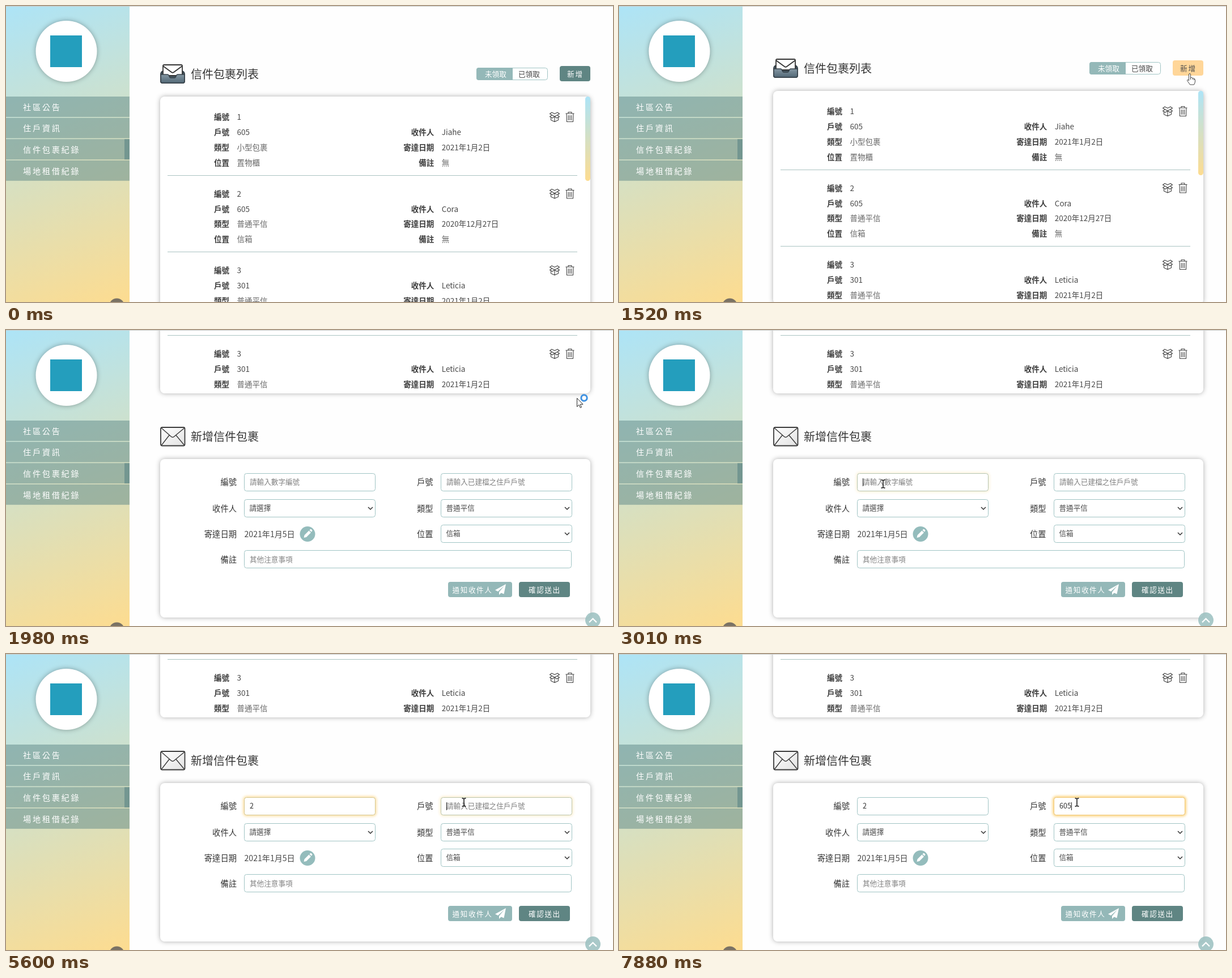
An HTML page that plays this animation: 1071 by 523 pixels, repeating every 8000 ms.

```html
<!DOCTYPE html>
<html lang="zh-Hant">
<head>
<meta charset="utf-8">
<title>信件包裹紀錄</title>
<style>
  html, body { margin: 0; width: 100%; height: 100%; overflow: hidden; background: #fefefe; }
  svg { display: block; width: 1071px; height: 523px; }
  text { font-family: "Noto Sans CJK TC", "Noto Sans CJK", "Noto Sans CJK JP", "Noto Sans", sans-serif; white-space: pre; }
  .label { font-weight: 600; fill: #3c3c3c; }
  .title, .field { font-weight: 500; fill: #333; }
  .value { font-weight: 350; fill: #484848; }
  .soft { font-weight: 300; fill: #666; }
  .hint { font-weight: 300; fill: #808080; }
  .light { font-weight: 350; fill: #fff; }
  .card { fill: #fff; filter: drop-shadow(0 0 4px rgba(0, 0, 0, .32)); }
  .box { fill: #fff; stroke: #a0c4c4; }
  .halo { fill: none; stroke: #fcd27a; stroke-width: 5; filter: blur(2px); }
  .icon { fill: none; stroke: #444; stroke-width: 1.1; stroke-linejoin: round; }
  .arrow { fill: none; stroke: #333; stroke-width: 1.5; }
</style>
</head>
<body>
<svg id="stage" viewBox="0 0 1071 523"></svg>
<script>
const LOOP = 8000;
const SCROLL = 425;
const clamp = v => Math.max(0, Math.min(1, v));
const progress = (t, from, to) => clamp((t - from) / (to - from));
const swing = p => .5 - Math.cos(p * Math.PI) / 2;

// ---------- drawing helpers: text is centred vertically on y ----------
const text = (x, y, str, cls, size = 13.5, extra = '') =>
  `<text x="${x}" y="${y + size * .38}" class="${cls}" font-size="${size}" ${extra}>${str}</text>`;
const rightText = (x, y, str, cls, size) => text(x, y, str, cls, size, 'text-anchor="end"');
const spaced = (x, y, str, cls, size, gap) => text(x, y, str, cls, size, `letter-spacing="${gap}"`);
const rect = (x, y, w, h, r, attrs) => `<rect x="${x}" y="${y}" width="${w}" height="${h}" rx="${r}" ${attrs}/>`;
const path = (d, attrs) => `<path d="${d}" ${attrs}/>`;
const at = (x, y, body, attrs = '') => `<g transform="translate(${x} ${y})" ${attrs}>${body}</g>`;

const inputBox = (x, y, w = 231) => rect(x + .5, y + .5, w, 31, 4, 'class="box"');
const selectBox = (x, y, str) => inputBox(x, y) + text(x + 9.5, y + 15.5, str, 'value', 12.6) +
  path(`M${x + 219} ${y + 14}l4 4 4-4`, 'class="arrow"');

const packageIcon = path('M0-5.5L-5-8-8.5-5.5-4.5-3.2-8.5-.5-4 2 0-.8 4 2 8.5-.5 4.5-3.2 8.5-5.5 5-8ZM-4.5-3.2L0-.8 4.5-3.2M-6.5 1V5.5L0 8.5 6.5 5.5V1M0-.8V8.5', 'class="icon"');
const trashIcon = path('M-7.5-6H7.5M-3-6V-8.5H3V-6M-6-6L-5.5 8.5H5.5L6-6M-2.7-3V6M0-3V6M2.7-3V6', 'class="icon"');

function parcel(index, [unit, kind, place, person, date]) {
  const y = 196 + index * 135.5;
  const left = [['編號', index + 1], ['戶號', unit], ['類型', kind], ['位置', place]];
  const right = [['收件人', person], ['寄達日期', date], ['備註', '無']];
  const visible = index < 2 ? 4 : 3;
  const tone = value => /^\w/.test(value) ? 'value' : 'soft';
  const pair = (x, line, [name, value]) =>
    rightText(x, y + line * 26.9, name, 'label') + text(x + 13.5, y + line * 26.9, value, tone(value));
  return left.slice(0, visible).map((p, i) => pair(394, i, p)).join('') +
    right.slice(0, visible - 1).map((p, i) => pair(755.3, i + 1, p)).join('') +
    at(968, y, packageIcon) + at(995, y, trashIcon) +
    (index < 2 ? rect(285, Math.floor(y + 103), 723, 1, 0, 'fill="#aac3c1"') : '');
}

const trayIcon = at(272, 103,
  path('M5 12Q1 13 1 18V30Q1 33 4 33H40Q43 33 43 30V18Q43 13 39 12Z', 'fill="#43545f" stroke="#37424a" stroke-width="1.8"') +
  path('M5 20V3Q5 1 7 1H37Q39 1 39 3V20Z', 'fill="#fff" stroke="#333" stroke-width="1.8"') +
  path('M5 3L20 14Q22 15.5 24 14L39 3', 'fill="none" stroke="#333" stroke-width="1.8"') +
  path('M1 18V30Q1 33 4 33H40Q43 33 43 30V18H31Q29 18 28 21T25 24H19Q17 24 16 21T13 18Z',
    'fill="url(#tray)" stroke="#37424a" stroke-width="1.6" stroke-linejoin="round"'));

const envelopeIcon = at(272, 596,
  rect(1, 1, 42.5, 32.5, 2.5, 'fill="url(#paper)" stroke="#3a3a3a" stroke-width="1.8"') +
  path('M2 2L19 17Q22 20 25 17L43 2M2 33L16 15M43 33L28 15', 'fill="none" stroke="#3a3a3a" stroke-width="1.4"'));

const listPage = trayIcon + text(326, 120, '信件包裹列表', 'title', 20) +
  rect(830.5, 109.5, 125, 21, 4, 'class="box"') +
  path('M894 109V131H834Q830 131 830 127V113Q830 109 834 109Z', 'fill="#94b8b8"') +
  text(845, 120, '未領取', 'light', 12.6) + text(904, 120, '已領取', 'value', 12.6) +
  rect(977, 106, 54, 27, 4, 'id="addButton"') +
  text(990, 120.5, '新增', 'light', 12.6, 'letter-spacing="1.8" id="addText"') +
  rect(272, 160, 759, 377, 8, 'class="card"') +
  rect(1022, 160, 9, 149, 4.5, 'fill="url(#bar)"') +
  [['605', '小型包裹', '置物櫃', 'Jiahe', '2021年1月2日'],
   ['605', '普通平信', '信箱', 'Cora', '2020年12月27日'],
   ['301', '普通平信', '', 'Leticia', '2021年1月2日']].map((p, i) => parcel(i, p)).join('');

// Form coordinates are those seen after scrolling to the end.
const fieldX = [430, 777];
const hints = ['請輸入數字編號', '請輸入已建檔之住戶戶號'];
const entry = i => {
  const x = fieldX[i] - 10;
  return inputBox(x, 253) +
    `<g id="glow${i}">` + rect(x + .5, 253.5, 231, 31, 4, 'class="halo"') +
    rect(x + .5, 253.5, 231, 31, 4, 'fill="#fff" stroke="#efc673"') + '</g>' +
    text(fieldX[i], 268.5, hints[i], 'hint', 12.6, `id="entry${i}"`);
};
const formLabel = (x, y, str) => rightText(x, y, str, 'field', 14.3);
const form = at(0, SCROLL,
  text(326, 188, '新增信件包裹', 'title', 20) +
  rect(272, 228, 759, 280, 8, 'class="card"') +
  formLabel(407, 269, '編號') + formLabel(407, 316, '收件人') +
  formLabel(407, 361, '寄達日期') + formLabel(407, 406, '備註') +
  formLabel(753.5, 269, '戶號') + formLabel(753.5, 316, '類型') + formLabel(753.5, 361, '位置') +
  entry(0) + entry(1) + rect(0, 262, 1, 14, 0, 'id="caret" fill="#222"') +
  selectBox(420, 299, '請選擇') + selectBox(767, 299, '普通平信') + selectBox(767, 344, '信箱') +
  text(420.5, 361, '2021年1月5日', 'value', 14.1) +
  '<circle cx="532" cy="360.5" r="13.5" fill="#94bcbc"/>' +
  path('M525.5 367L526.5 362.5 534.5 354.5 538 358 530 366ZM535.5 353.5L537 352Q538 351.5 539 352.5L540 353.5Q541 354.5 540 355.5L538.8 356.8Z', 'fill="#fff"') +
  inputBox(420, 389, 577) + text(430, 405, '其他注意事項', 'hint', 12.6) +
  rect(780, 445, 113, 27, 4, 'fill="#94b8b8"') + spaced(787.5, 459.5, '通知收件人', 'light', 12.6, 1.6) +
  path('M882 449L863 459.5 868 462 879 452 870 463V468L873.5 464.5 878.5 466.5Z', 'fill="#fff"') +
  rect(905, 445, 90, 27, 4, 'fill="#5f8583"') + spaced(922, 459.5, '確認送出', 'light', 12.6, 1.6));

const menu = ['社區公告', '住戶資訊', '信件包裹紀錄', '場地租借紀錄'].map((name, i) => {
  const y = 160 + i * 37.6;
  return rect(0, y, 218, 36, 0, 'fill="#5f8787" fill-opacity=".5"') +
    spaced(30, y + 18.5, name, 'light', 14.2, 2.7);
}).join('');

const sidebar = rect(0, 0, 218, 523, 0, 'fill="url(#side)"') +
  '<circle cx="106.5" cy="80" r="54" class="card"/>' +
  rect(78, 52, 56, 56, 0, 'fill="#249ebd"') + menu +
  rect(209, 235.2, 9, 36, 0, 'fill="#5f8787" fill-opacity=".65"') +
  '<circle cx="195.5" cy="530" r="13.5" fill="#7a7264"/>';

const gradient = (id, from, to, coords) =>
  `<linearGradient id="${id}" ${coords}><stop stop-color="${from}"/><stop offset="1" stop-color="${to}"/></linearGradient>`;
const downwards = 'x1="0" y1="0" x2="0" y2="1"';

const cursors =
  path('M.5.5V15.5L4 12.2 6.3 17.3 8.5 16.4 6.2 11.3H11Z', 'id="pointer" fill="#fff" stroke="#111" stroke-width=".9"') +
  path('M-1.5 12V1Q-1.5-.5 0-.5T1.5 1V6.5Q4.5 5.5 5 7.5 7 7 7.5 8.5 9.5 8.5 9.5 10.5V13Q9.5 16 7.5 19H.5L-4 12.5Q-5 11-4 10.3T-1.5 12M1.5 6.5V10M5 7.5V10M7.5 8.5V11',
    'id="hand" fill="#fff" stroke="#333" stroke-width=".9"') +
  path('M-3.5-7H-1.5L0-6 1.5-7H3.5M0-6V6M-3.5 7H-1.5L0 6 1.5 7H3.5', 'id="beam" fill="none" stroke="#111" stroke-width="1.5"') +
  '<circle id="busy" cx="13" cy="0" r="5.2" fill="none" stroke="#3f92e2" stroke-width="3"/>';

document.getElementById('stage').innerHTML =
  '<defs>' +
  gradient('side', '#ade4f7', '#fddc90', 'gradientUnits="userSpaceOnUse" x1="12" y1="-4.5" x2="206" y2="527.5"') +
  gradient('bar', '#ade4f7', '#fddc90', downwards) +
  gradient('tray', '#8497a3', '#526876', downwards) +
  gradient('paper', '#fff', '#e2e2e2', 'x1="0" y1="0" x2="1" y2="1"') +
  '</defs>' +
  `<g id="page">${listPage}${envelopeIcon}${form}</g>` + sidebar +
  rect(0, 0, 1071, 1, 0, 'fill="#c9cccb"') +
  at(1035.5, 0, '<circle r="13.5" fill="#94bcbc" fill-opacity=".8"/>' +
    path('M-6.5 4L0-2.5 6.5 4', 'fill="none" stroke="#fff" stroke-width="2.2"'), 'id="toTop"') +
  `<g id="cursor">${cursors}</g>`;

// ---------- motion ----------
const $ = id => document.getElementById(id);
const show = (id, on) => $(id).setAttribute('visibility', on ? 'visible' : 'hidden');
const move = (id, x, y) => $(id).setAttribute('transform', `translate(${x} ${y})`);
const mix = (a, b, p) => `rgb(${a.map((v, i) => Math.round(v + (b[i] - v) * p))})`;

// Moving passages advance in even ticks: [start, end, number of ticks].
const passages = [[140, 910, 11], [990, 1290, 5], [1520, 1980, 7], [2150, 2930, 11],
  [3010, 3220, 4], [4730, 5350, 9], [5600, 5760, 3]];
function snap(t) {
  const passage = passages.filter(p => t >= p[0]).pop();
  if (!passage) return 0;
  const [start, end, count] = passage;
  const tick = (end - start) / (count - 1);
  return Math.min(end, start + Math.floor((t - start) / tick + .01) * tick);
}

// start, end, from x, y, to x, y, sag
const strokes = [
  [140, 910, 1042, 443, 1010, 137, 0],
  [910, 1050, 1010, 137, 1007, 120, 0],
  [2070, 2930, 1007, 120, 466, 272, 0],
  [4650, 5350, 466, 272, 808, 262, 46]
];
function cursorAt(t) {
  const [start, end, x0, y0, x1, y1, sag] = strokes.filter(s => t >= s[0]).pop() || strokes[0];
  const p = swing(progress(t, start, end));
  return [x0 + (x1 - x0) * p, y0 + (y1 - y0) * p + sag * Math.sin(Math.PI * p)].map(Math.round);
}

const caretSpans = [[3010, 3700], [4160, 4730], [5190, 6220], [6760, LOOP]];
const within = (t, a, b) => t >= a && t < b;

function setEntry(i, typed) {
  const el = $('entry' + i);
  const content = typed || hints[i];
  if (el.textContent === content) return;
  el.textContent = content;
  el.setAttribute('class', typed ? 'field' : 'hint');
}

function render(now) {
  const t = snap(now);

  move('page', 0, -Math.round(SCROLL * swing(progress(t, 1479, 1897))));
  const rise = (1 - progress(t, 1597, 1980)) ** 2;
  move('toTop', 1035.5, 512.5 + 28 * rise);
  $('toTop').setAttribute('opacity', 1 - rise);

  const hover = progress(t, 930, 1290);
  $('addButton').setAttribute('fill', mix([95, 133, 131], [255, 214, 153], hover));
  $('addText').style.fill = mix([255, 255, 255], [75, 75, 75], hover);

  const swap = progress(t, 5520, 5760);
  $('glow0').setAttribute('opacity', progress(t, 2940, 3220) * (1 - swap));
  $('glow1').setAttribute('opacity', swap);

  const typed = [now >= 4160 ? '2' : '', '605'.slice(0, [7020, 7540, 7880].filter(k => now >= k).length)];
  typed.forEach((str, i) => setEntry(i, str));
  const active = now < 5600 ? 0 : 1;
  $('caret').setAttribute('x', fieldX[active] + 7 * typed[active].length);
  show('caret', caretSpans.some(([a, b]) => within(now, a, b)));

  const [x, y] = cursorAt(t);
  move('cursor', x, y);
  const hand = within(t, 990, 1980);
  const beam = t > 1980 && within(y, 253, 286) && (within(x, 420, 652) || within(x, 767, 999));
  show('hand', hand);
  show('beam', beam);
  show('pointer', now >= 140 && !hand && !beam);
  show('busy', within(now, 1980, 2150));
}

const began = performance.now();
function frame() {
  render((performance.now() - began) % LOOP);
  requestAnimationFrame(frame);
}
frame();
</script>
</body>
</html>
```
